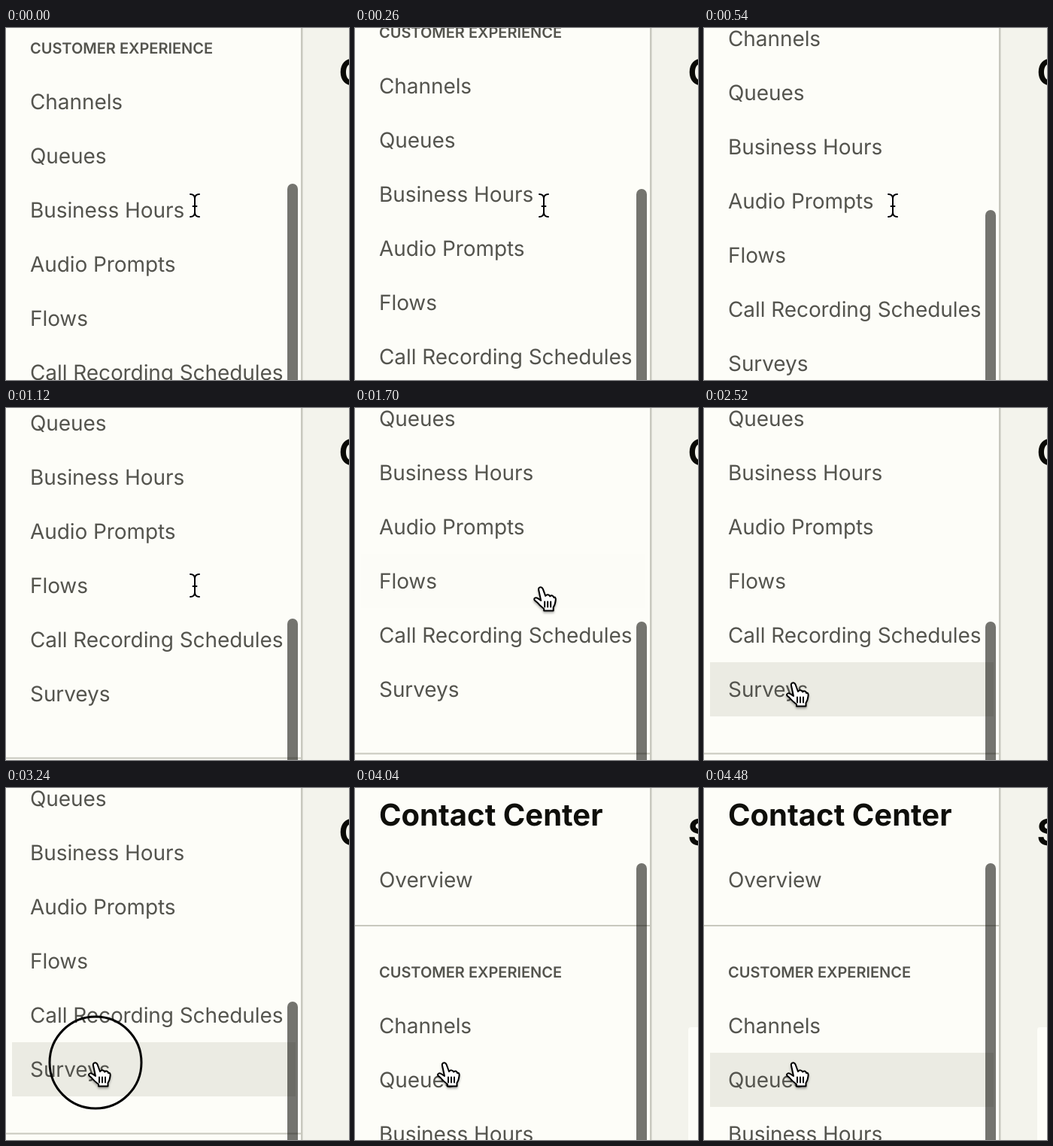
Write an HTML page that moves like this. It is 456 px wide and 468 px high and loops after 4.7 s.

```html
<!DOCTYPE html>
<html lang="en">
<head>
<meta charset="utf-8">
<title>Sidebar navigation</title>
<style>
  html, body { margin: 0; width: 100%; height: 100%; overflow: hidden; background: #f3f3ec; }
  svg { display: block; width: 456px; height: 468px; }
  text {
    font-family: Inter, "Liberation Sans", sans-serif; fill: #54544e;
    white-space: pre; text-rendering: geometricPrecision;
  }
  .item { font-size: 28px; letter-spacing: -.08px; }
  .section { font-size: 20px; font-weight: 600; }
  .title { font-size: 40px; font-weight: 700; fill: #0f0f0b; }
  .heading { font-size: 48px; font-weight: 700; fill: #0a0a06; }
  .hover { fill: #ebebe3; }
  .line { fill: #c8c8be; }
</style>
</head>
<body>
<svg viewBox="0 0 456 468">
  <defs>
    <path id="beamShape" d="M-6-15Q0-15 0-9V9Q0 15-6 15M6-15Q0-15 0-9M0 9Q0 15 6 15M-2.5 1H2.5"/>
  </defs>
  <rect width="456" height="468" fill="#f3f3ec"/>
  <text id="heading" class="heading" x="442.5" y="76">C</text>
  <rect id="card" x="443" y="318" width="40" height="180" rx="4" fill="#fdfdf8"/>

  <rect width="393" height="468" fill="#fdfdf8"/>
  <g id="content">
    <text class="title" x="32" y="50">Contact Center</text>
    <text class="item" x="32" y="132">Overview</text>
    <rect class="line" y="182" width="393" height="2"/>
    <text class="section" x="32" y="252">CUSTOMER EXPERIENCE</text>
    <g id="menu"></g>
    <rect class="line" y="832.5" width="393" height="2"/>
  </g>
  <rect class="line" x="392" width="2.5" height="468"/>
  <rect id="thumb" x="374" width="14" height="600" rx="7" fill="#0d0d08" opacity=".57"/>

  <circle id="press" r="61" fill="none" stroke="#000" stroke-width="3"/>
  <g id="beam" fill="none" stroke-linecap="round">
    <use href="#beamShape" stroke="#fff" stroke-width="4.5"/>
    <use href="#beamShape" stroke="#000" stroke-width="2"/>
  </g>
  <g id="hand" stroke="#000" stroke-width="2" stroke-linejoin="round" stroke-linecap="round"
     style="filter: drop-shadow(0 2px 1.5px rgba(0,0,0,.35))">
    <path fill="#fff" d="M-3 3C-4-1 1-2 2.5 1.5L6 11C8 8.5 11 9 12 11.5C14 9.5 16.5 10.5 17 13
      C19 12 20 14 19.500 17C19 21 18 24 16.500 26V30.500H4V28C0 25-3 22-5 19.500L-8.500 16.500
      C-10 14-7 12.500-4.500 14L0 17Z"/>
    <path fill="none" d="M5 18.500V25.500M9 18.500V25.500M13 18.500V25.500"/>
  </g>
</svg>
<script>
const LOOP = 4700, PAGE_CHANGE = 3780, FADE = 170, ROW = 72, FIRST_ROW = 280;
const $ = id => document.getElementById(id);

// Each item may be hovered from one moment until another.
const items = [
  { label: 'Channels' },
  { label: 'Queues', on: 4320, off: Infinity },
  { label: 'Business Hours' },
  { label: 'Audio Prompts' },
  { label: 'Flows', on: 1670, off: 1950 },
  { label: 'Call Recording Schedules', on: 1940, off: 2086 },
  { label: 'Surveys', on: 2086, off: Infinity, until: PAGE_CHANGE }
];

// Keyframes: time, then values.
const scrollKeys = [[0, 218], [120, 222], [260, 239], [400, 268], [540, 302],
  [700, 336], [860, 356], [1000, 364], [1120, 368], [1300, 372], [1540, 374]];
const pointerKeys = [[1660, 251, 236], [1800, 238, 246], [1950, 196, 280],
  [2060, 150, 332], [2120, 132, 352], [2260, 124, 361], [2440, 119, 366]];

function make(tag, attrs, parent) {
  const node = document.createElementNS('http://www.w3.org/2000/svg', tag);
  for (const key in attrs) node.setAttribute(key, attrs[key]);
  return parent.appendChild(node);
}

items.forEach((item, i) => {
  const y = FIRST_ROW + i * ROW;
  if (item.on) item.row = make('rect', { class: 'hover', x: 8, y, width: 377, height: ROW }, $('menu'));
  make('text', { class: 'item', x: 32, y: y + 46 }, $('menu')).textContent = item.label;
});

function sample(keys, t) {
  const next = keys.findIndex(key => key[0] > t);
  if (next === 0) return keys[0].slice(1);
  if (next < 0) return keys[keys.length - 1].slice(1);
  const a = keys[next - 1], b = keys[next];
  const u = (t - a[0]) / (b[0] - a[0]);
  return a.slice(1).map((v, i) => v + (b[i + 1] - v) * u);
}

function ramp(t, start) {
  const u = Math.min(1, Math.max(0, (t - start) / FADE));
  return u * u * (3 - 2 * u);
}

const show = (id, visible) => $(id).setAttribute('visibility', visible ? 'visible' : 'hidden');
const move = (id, x, y) => $(id).setAttribute('transform', `translate(${x} ${y})`);

function draw(t) {
  const changed = t >= PAGE_CHANGE;
  const scrollAt = time => changed ? 0 : sample(scrollKeys, time)[0];
  move('content', 0, -Math.round(scrollAt(t)));
  // The scrollbar trails the content slightly.
  $('thumb').setAttribute('y', Math.round(100 + 0.491 * scrollAt(t - 50)));

  for (const { row, on, off, until = Infinity } of items) {
    if (row) row.setAttribute('opacity', t < until ? ramp(t, on) - ramp(t, off) : 0);
  }

  $('heading').textContent = changed ? 'S' : 'C';
  show('card', changed);

  const [x, y] = sample(pointerKeys, t);
  const pointing = t >= 1670;
  show('beam', !pointing);
  show('hand', pointing);
  show('press', t >= 3240 && t < 3340);
  move('beam', x, y);
  move('hand', x, y);
  move('press', x, y - 1);
}

const start = performance.now();
function tick() {
  draw((performance.now() - start) % LOOP);
  requestAnimationFrame(tick);
}
tick();
</script>
</body>
</html>
```
